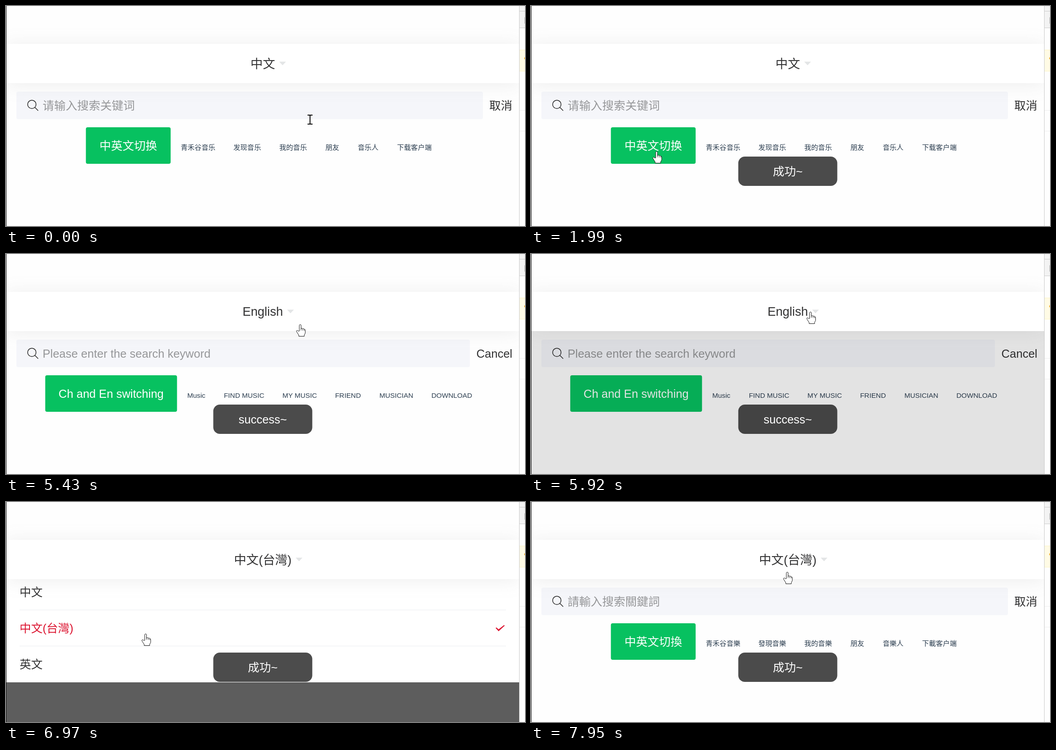
Recreate the animation shown at these times as an HTML page. Size 1148 by 488 pixels, loop 7.99 s.

```html
<!DOCTYPE html>
<html lang="zh">
<head>
<meta charset="utf-8">
<style>
  html, body { margin: 0; width: 100%; height: 100%; overflow: hidden; background: #fff; }
  svg { display: block; width: 1148px; height: 488px; font: 25.5px "Liberation Sans", "Noto Sans CJK SC", sans-serif; fill: #323233; }
  .tw { font-family: "Liberation Sans", "Noto Sans CJK TC", sans-serif; }
  .title { font-size: 27.3px; }
  .link { font-size: 15.3px; fill: #2c3e50; }
  .hint { fill: #969799; }
  .light { fill: #fff; }
  .red { fill: #dc1430; }
  .mid { text-anchor: middle; }
  .end { text-anchor: end; }
  .bar { fill: #fff; filter: drop-shadow(0 3.6px 20px rgba(100, 101, 102, .11)); }
  .line { stroke: #ebedf0; }
  .pen { fill: none; stroke: #222; stroke-width: 1; }
</style>
</head>
<body>
<svg id="stage" viewBox="0 0 1148 488" xmlns="http://www.w3.org/2000/svg"></svg>
<script>
const LOOP = 7990;
const NAV_BOTTOM = 171, ROW = 80, PANEL = 3 * ROW;

const zhLayout = { fieldEnd: 1055, button: [176.7, 364.2], linkX: [386.5, 503, 604.5, 706.5, 778, 865], drop: .6 };
const langs = {
  zh: { ...zhLayout, cls: '', title: '中文', titleW: 54.6, hint: '请输入搜索关键词', cancel: '取消',
    label: '中英文切换', links: ['青禾谷音乐', '发现音乐', '我的音乐', '朋友', '音乐人', '下载客户端'],
    rows: ['中文', '中文(台湾)', '英文'], picked: 0, toast: '成功~' },
  tw: { ...zhLayout, cls: 'tw', title: '中文(台灣)', titleW: 127.4, hint: '請輸入搜索關鍵詞', cancel: '取消',
    label: '中英文切換', links: ['青禾谷音樂', '發現音樂', '我的音樂', '朋友', '音樂人', '下載客戶端'],
    rows: ['中文', '中文(台灣)', '英文'], picked: 1, toast: '成功~' },
  en: { cls: '', title: 'English', titleW: 89.5, hint: 'Please enter the search keyword', cancel: 'Cancel',
    label: 'Ch and En switching', links: ['Music', 'FIND MUSIC', 'MY MUSIC', 'FRIEND', 'MUSICIAN', 'DOWNLOAD'],
    rows: ['Chinese', 'Chinese (Taiwan)', 'English'], picked: 2, toast: 'success~',
    fieldEnd: 1026, button: [86.8, 378.3], linkX: [401, 482, 611.5, 728, 826, 941], drop: 0 }
};

// [time, language]
const switches = [[0, 'zh'], [790, 'en'], [1860, 'zh'], [2960, 'en'], [4300, 'zh'], [4860, 'en'], [6930, 'tw']];

// [time, x, y] of the pointer's hot spot
const path = [
  [0, 672.5, 252], [200, 672.5, 252], [690, 278, 323], [5190, 278, 323], [5430, 651, 157],
  [5800, 618.5, 129], [6110, 618.5, 129], [6620, 309, 293], [7760, 309, 293], [7950, 567, 156], [LOOP, 567, 156]
];

const text = (s, x, y, cls = '') => `<text x="${x}" y="${y}" class="${cls}">${s}</text>`;
const rect = (x, y, w, h, fill, extra = '') =>
  `<rect x="${x}" y="${y}" width="${w}" height="${h}" fill="${fill}" ${extra}/>`;
const perLang = draw => Object.entries(langs)
  .map(([id, l]) => `<g data-lang="${id}" class="${l.cls}">${draw(l)}</g>`).join('');

function page(l) {
  const [left, right] = l.button;
  return rect(23, 190, l.fieldEnd - 23, 61, '#f5f6fa', 'rx="4"')
    + text(l.hint, 81, 229.8 + l.drop, 'hint')
    + text(l.cancel, 1120, 229.8 + l.drop, 'end')
    + rect(left, 269, right - left, 81, '#07c160', 'rx="4"')
    + text(l.label, (left + right) / 2, 318.8 + l.drop, 'mid light')
    + l.links.map((s, i) => text(s, l.linkX[i], 318.5 + l.drop, 'link')).join('');
}

function options(l) {
  return l.rows.map((s, i) => {
    const mid = NAV_BOTTOM + ROW * (i + .5), on = i === l.picked;
    return text(s, 30, mid + 8.8 + l.drop, on ? 'red' : '')
      + (on ? `<path class="red" d="M1083 ${mid - .5}l1.8-1.3 4.8 4.2 12-9.4 1.6 1.2-13.6 12.6z"/>` : '');
  }).join('');
}

const header = l => text(l.title, 568, 137 + l.drop, 'title mid');

const stage = document.getElementById('stage');
stage.innerHTML = `
  <clipPath id="view"><rect x="1" width="1134" height="488"/></clipPath>
  <clipPath id="below"><rect x="1" y="${NAV_BOTTOM}" width="1134" height="317"/></clipPath>
  ${rect(0, 0, 1148, 488, '#fefefe')}
  <g clip-path="url(#view)">
    ${perLang(page)}
    <g class="pen" style="stroke-width:1.5"><circle cx="57.2" cy="218.2" r="9.3"/><path d="M63.8 224.8l7.4 7.4"/></g>
    <g clip-path="url(#below)">
      <rect id="shade" x="1" y="${NAV_BOTTOM}" width="1134" height="317" fill="#000"/>
      <g id="panel">
        ${rect(1, NAV_BOTTOM, 1134, PANEL, '#fff')}
        <path class="line" d="M30 ${NAV_BOTTOM + ROW - .5}H1106M30 ${NAV_BOTTOM + 2 * ROW - .5}H1106"/>
        ${perLang(options)}
      </g>
    </g>
    <rect class="bar" x="1" y="84" width="1134" height="87"/>
    <g id="head">${perLang(header)}</g>
    <path id="arrow" d="M-7.5-4H7.5L0 4z"/>
  </g>
  ${rect(0, 0, 1, 488, '#111')}
  ${rect(1136, 0, 12, 48, '#f3f3f3')}
  ${rect(1136, 11, 12, 1, '#ccc')}${rect(1136, 48, 12, 1, '#ccc')}
  ${rect(1147, 25, 1, 14, '#aaa')}
  ${rect(1136, 97, 12, 48, '#fffbe5')}
  ${rect(1136, 97, 12, 1, '#fff5c2')}${rect(1136, 144, 12, 1, '#fff5c2')}
  <path d="M1148 113l-2 3 2 3z" fill="#f4a816"/>
  ${rect(1136, 231, 12, 1, '#eee')}${rect(1136, 277, 12, 1, '#eee')}
  ${rect(1135, 0, 1, 488, '#c8c8c8')}
  <g id="toast">
    ${rect(458.5, 334, 219, 65, '#000', 'rx="14.5" fill-opacity=".7"')}
    ${perLang(l => text(l.toast, 568, 375.8 + l.drop / 2, 'mid light'))}
  </g>
  <g id="pointer">
    <g data-kind="hand">
      <path d="M-2.2 14V1.6a2 2 0 0 1 4 0V9q.2-1.4 1.9-1.2 1.8.2 1.9 1.6.3-1 1.8-.8 1.5.3 1.6 1.6 2 0 2 2.1v6.2l-2.2 4v3H-3.3V23L-8 15.6q-1.5-2.5.4-3 1.8-.3 3.2 1.4z" fill="#fff" stroke="#111" stroke-linejoin="round"/>
      <path class="pen" d="M1.8 8.5v4M5.6 9.4v3.4M9 10.2v3"/>
    </g>
    <g data-kind="beam"><path class="pen" style="stroke:#000;stroke-width:2" d="M-5.5-10h4q1.5 0 1.5 1.5V8.5q0 1.5-1.5 1.5h-4M5.5-10h-4q-1.5 0-1.5 1.5M0 8.5q0 1.5 1.5 1.5h4"/></g>
    <g data-kind="arrow"><path d="M0 0V20l4.6-4.4 3.2 7.2 3-1.3-3.2-7h6.4z" fill="#fff" stroke="#111"/></g>
  </g>`;

const $ = id => document.getElementById(id);
const byLang = [...stage.querySelectorAll('[data-lang]')];
const byKind = [...stage.querySelectorAll('[data-kind]')];
const show = (list, key, value) => list.forEach(n => n.style.display = n.dataset[key] === value ? '' : 'none');

const clamp = x => Math.min(1, Math.max(0, x));
const span = (t, start, length) => clamp((t - start) / length);
const easeOut = x => 1 - (1 - x) ** 1.65;
const easeIn = x => x ** 1.72;
const smooth = x => x * x * (3 - 2 * x);

function pointerAt(t) {
  const i = Math.max(1, path.findIndex(p => p[0] > t));
  const [t0, x0, y0] = path[i - 1], [t1, x1, y1] = path[i];
  const k = smooth(span(t, t0, t1 - t0));
  return [x0 + (x1 - x0) * k, y0 + (y1 - y0) * k];
}

function pointerKind(x, y, lang, open) {
  const [left, right] = lang.button;
  if (open || (y > 84 && y < NAV_BOTTOM)) return 'hand';
  if (x > left && x < right && y > 269 && y < 350) return 'hand';
  return x > 23 && x < lang.fieldEnd && y > 190 && y < 253 ? 'beam' : 'arrow';
}

function render(t) {
  const id = switches.filter(s => s[0] <= t).pop()[1], lang = langs[id];
  show(byLang, 'lang', id);

  const opened = t >= 5922 && t < 6930;
  const slide = easeOut(span(t, 5922, 200)) - easeIn(span(t, 6938, 200));
  const fade = easeOut(span(t, 5902, 200)) - easeIn(span(t, 6920, 200));
  $('panel').setAttribute('transform', `translate(0 ${Math.round((slide - 1) * PANEL)})`);
  $('shade').setAttribute('opacity', fade * .7);
  $('head').setAttribute('class', opened ? 'red' : '');
  $('arrow').setAttribute('transform', `translate(${568 + lang.titleW / 2 + 16.5} 127.5) scale(1 ${opened ? -1 : 1})`);
  $('arrow').style.fill = opened ? '#e43f55' : '#e3e5e6';
  $('toast').setAttribute('opacity', easeOut(span(t, 790, 300)));

  const [x, y] = pointerAt(t);
  $('pointer').setAttribute('transform', `translate(${x} ${y})`);
  show(byKind, 'kind', pointerKind(x, y, lang, slide > 0));
}

function tick() {
  render(performance.now() % LOOP);
  requestAnimationFrame(tick);
}
tick();
</script>
</body>
</html>
```
